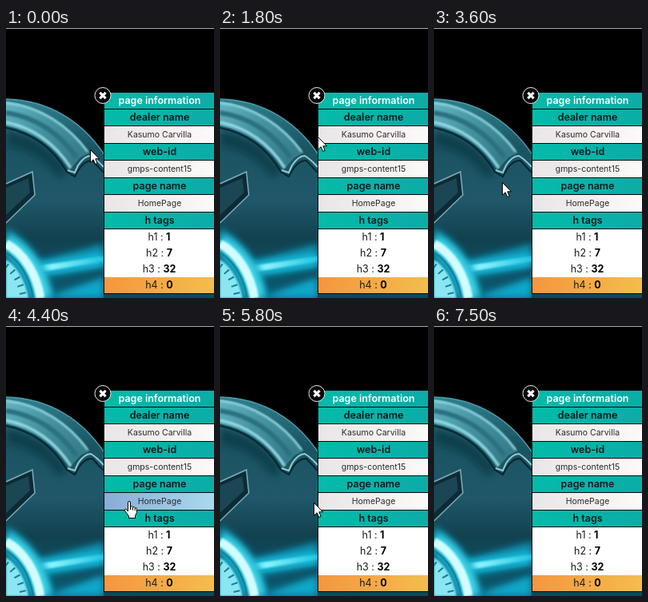
An HTML page that plays this animation: 260 px wide and 338 px high, repeating every 7600 ms.

```html
<!DOCTYPE html>
<html lang="en">
<head>
<meta charset="utf-8">
<title>Page information panel</title>
<style>
html, body { margin: 0; width: 100%; height: 100%; overflow: hidden; background: #000; }
svg { display: block; width: 260px; height: 338px; }
.panel { font-family: Inter, "Noto Sans", sans-serif; text-anchor: middle; }
.head { font-size: 12.5px; font-weight: 600; }
.value { font-size: 10.5px; fill: #2b2b2b; }
.count { font-size: 12.5px; fill: #1c1c1c; }
.count tspan { font-weight: 700; fill: #000; }
.tip { font: 11.7px "Open Sans", "Noto Sans", sans-serif; fill: #575757; }
</style>
</head>
<body>
<svg viewBox="0 0 260 338" xmlns="http://www.w3.org/2000/svg">
  <defs>
    <linearGradient id="body" x1="0" y1="0" x2="0" y2="1">
      <stop offset="0" stop-color="#2f7f8d"/>
      <stop offset=".25" stop-color="#1a5361"/>
      <stop offset=".5" stop-color="#20586a"/>
      <stop offset=".7" stop-color="#12414f"/>
      <stop offset="1" stop-color="#0a5a72"/>
    </linearGradient>
    <linearGradient id="rim" x1="0" y1="0" x2="1" y2=".8">
      <stop offset="0" stop-color="#62b4c1"/>
      <stop offset=".45" stop-color="#4693a2"/>
      <stop offset="1" stop-color="#347886"/>
    </linearGradient>
    <linearGradient id="beam" x1="0" x2="1">
      <stop offset="0" stop-color="#35e2f6"/>
      <stop offset=".35" stop-color="#8bf3fc"/>
      <stop offset="1" stop-color="#22c4e0"/>
    </linearGradient>
    <linearGradient id="teal">
      <stop offset="0" stop-color="#04bba9"/>
      <stop offset="1" stop-color="#0caca7"/>
    </linearGradient>
    <linearGradient id="plain">
      <stop offset="0" stop-color="#e8e6e6"/>
      <stop offset="1" stop-color="#fbfaf8"/>
    </linearGradient>
    <linearGradient id="hover">
      <stop offset="0" stop-color="#88acd6"/>
      <stop offset="1" stop-color="#a8daec"/>
    </linearGradient>
    <linearGradient id="warm">
      <stop offset="0" stop-color="#f5963f"/>
      <stop offset="1" stop-color="#f3bd4c"/>
    </linearGradient>
    <linearGradient id="tipFill" x1="0" y1="0" x2="0" y2="1">
      <stop offset="0" stop-color="#fff"/>
      <stop offset="1" stop-color="#e5e6f0"/>
    </linearGradient>
    <filter id="soft1" x="-20%" y="-50%" width="140%" height="200%"><feGaussianBlur stdDeviation="1"/></filter>
    <filter id="soft4" x="-30%" y="-100%" width="160%" height="300%"><feGaussianBlur stdDeviation="4"/></filter>
  </defs>

  <rect width="260" height="338" fill="#000"/>
  <rect width="260" height="1" fill="#aaa"/>

  <g id="scene">
    <path d="M0 89C50 90 98 114 130 170V338H0Z" fill="url(#body)"/>
    <path d="M0 89C50 90 98 114 130 170" fill="none" stroke="#4c9dab" stroke-width="1.4"/>
    <path d="M0 128C34 134 58 152 76 180L66 188C48 164 28 152 0 147Z" fill="#113f4c" filter="url(#soft4)"/>

    <path d="M0 92C42 96 80 122 105 156L93 162 86 170 79 178C62 150 36 130 0 122Z" fill="url(#rim)"/>
    <path d="M0 94C42 98 78 122 102 155" fill="none" stroke="#8fd3dc" stroke-width="2.5" filter="url(#soft1)"/>
    <path d="M0 106C38 112 67 132 88 162" fill="none" stroke="#2c7180" stroke-width="6" filter="url(#soft1)"/>
    <path d="M0 118C36 125 62 146 81 175" fill="none" stroke="#9adfe7" stroke-width="3" filter="url(#soft1)"/>
    <path d="M0 125C35 132 59 151 76 180L86 186 91 177Q99 165 108 166L122 181" fill="none" stroke="#08242e" stroke-width="2"/>
    <path d="M77 178L86 181 90 172Q98 160 106 160 113 164 122 174" fill="none" stroke="#8fcbd3" stroke-width="2"/>

    <path d="M0 195L33 180 36 209 0 244Z" fill="#0c2b36"/>
    <path d="M0 200L28 188 30 206 0 234Z" fill="#1b4653"/>
    <path d="M0 195L33 180 36 209 0 244" fill="none" stroke="#79aab3" stroke-width="1.6"/>

    <path d="M24 296L122 270V300L35 314Z" fill="#0f8fae" filter="url(#soft4)"/>
    <path d="M24 297L122 282V297L35 310Z" fill="#17bddd" filter="url(#soft4)"/>
    <path d="M24 300L122 286V292L33 307Z" fill="url(#beam)" filter="url(#soft1)"/>
    <path d="M48 338L122 312V338Z" fill="#11a8ca" filter="url(#soft4)"/>
    <path d="M0 250C30 266 52 298 60 338H0Z" fill="#0b95b4" filter="url(#soft4)"/>
    <path d="M0 268C24 280 42 306 47 338" fill="none" stroke="#41d9ed" stroke-width="18" filter="url(#soft4)"/>
    <path d="M0 270C22 282 38 307 43 338" fill="none" stroke="#d2fcff" stroke-width="11" filter="url(#soft1)"/>
    <path d="M0 290C15 300 24 317 28 338H0Z" fill="#8ae6f1" filter="url(#soft1)"/>
    <path d="M0 281C18 292 30 313 34 338" fill="none" stroke="#157f98" stroke-width="2"/>
    <path d="M0 298C12 306 19 320 22 338" fill="none" stroke="#157f98" stroke-width="8" stroke-dasharray="2 8"/>
    <rect x="122" y="333" width="138" height="5" fill="#0b4a5a"/>
  </g>

  <g id="panel" class="panel"></g>
  <g>
    <circle cx="121" cy="84.5" r="10" fill="#080808" stroke="#e8e8e8"/>
    <path d="M117.4 80.9L124.6 88.1M124.6 80.9L117.4 88.1" stroke="#fff" stroke-width="3.2"/>
  </g>
  <g id="tips"></g>
  <g id="cursor" stroke="#000" fill="#fff" stroke-linejoin="round">
    <path id="arrow" d="M.5 .5V16.2L4.2 12.8 6.7 18.5 9.2 17.4 6.8 11.8H11.6Z"/>
    <g id="hand" transform="translate(-5 0)">
      <path d="M4.5 13V2Q4.5 .5 6 .5T7.5 2V7Q10 5.8 10.5 7.7 12.8 6.8 13.2 8.6 15.5 8.2 15.5 10.5V14.5L13.5 18.5V21.5H5.5V19L1 13Q-.4 10.6 1.2 10.2 2.6 9.8 4.5 13Z"/>
      <path d="M7.5 7V11M10.5 8V11.5M13.2 9V12" fill="none"/>
    </g>
  </g>
</svg>
<script>
const LOOP = 7600, STEP = 100;
const $ = id => document.getElementById(id);

function add(parent, tag, attrs, text) {
  const el = document.createElementNS("http://www.w3.org/2000/svg", tag);
  for (const k in attrs) el.setAttribute(k, attrs[k]);
  if (text) el.textContent = text;
  parent.append(el);
  return el;
}

const panel = $("panel");
const box = (y, height, fill) => add(panel, "rect", { x: 122, y, width: 138, height, fill });
const label = (x, y, cls, text, fill = "") =>
  add(panel, "text", { x, y, class: cls, style: fill && `fill: ${fill}` }, text);

function heading(y, text, fill = "#08191b") {
  box(y, 20, "url(#teal)");
  label(192, y + 14, "head", text, fill);
}

// The black backing shows through as the lines between rows.
box(80, 253, "#080808");
heading(81, "page information", "#fff");
const rows = [
  ["dealer name", "Kasumo Carvilla"],
  ["web-id", "gmps-content15"],
  ["page name", "HomePage"]
].map(([name, value], i) => {
  const y = 102 + i * 43;
  heading(y, name);
  const rect = box(y + 21, 21, "url(#plain)");
  label(192, y + 35, "value", value);
  return { top: y + 21, rect };
});
heading(231, "h tags");
box(252, 60, "#fff");
box(312, 20, "url(#warm)");
[1, 7, 32, 0].forEach((n, i) => {
  const line = label(191.5, 266 + i * 20, "count", `h${i + 1} : `);
  add(line, "tspan", {}, String(n));
});
add(panel, "path", { d: "M122.5 80V333", stroke: "#080808" });

// text, x, y, width, start, end
const tips = [
  ["Copy Dealer Name", 155.5, 157.5, 112, 1400, 1800],
  ["Copy Web ID", 157.5, 197.5, 82, 3000, 3400],
  ["Copy Page Name", 159.5, 242.5, 103, 5100, 5700],
  ["Zirn Glide", 121.5, 244.5, 69, 6100, 7500]
].map(([text, x, y, width, start, end]) => {
  const g = add($("tips"), "g", { transform: `translate(${x} ${y})` });
  add(g, "rect", { x: 2, y: 2, width, height: 19, rx: 2, fill: "#000", opacity: .3 });
  add(g, "rect", { width, height: 19, rx: 2, fill: "url(#tipFill)", stroke: "#767676" });
  add(g, "text", { x: 5.5, y: 13.5, class: "tip" }, text);
  return { g, start, end };
});

// time, x, y of the pointer tip
const path = [
  [0, 105, 152], [200, 105, 152], [800, 176, 133], [1100, 150, 134],
  [1600, 150, 134], [1800, 122, 136], [2100, 98, 167], [2500, 152, 174],
  [3200, 152, 174], [3600, 85, 193], [3800, 91, 217], [4500, 163, 219],
  [4600, 154, 219], [5500, 154, 219], [5800, 117, 221], [6200, 117, 221],
  [6400, 71, 267], [6600, 38, 282], [6700, 100, 300]
];
const GONE = 6800;

function pointer(t) {
  const i = path.findIndex(p => p[0] > t);
  if (i < 0) return path[path.length - 1].slice(1);
  const [t0, x0, y0] = path[i - 1], [t1, x1, y1] = path[i];
  const k = (t - t0) / (t1 - t0);
  return [x0 + (x1 - x0) * k, y0 + (y1 - y0) * k];
}

const show = (el, on) => el.setAttribute("visibility", on ? "visible" : "hidden");

function draw(t) {
  const [x, y] = pointer(t), seen = t < GONE;
  let over = false;
  for (const { top, rect } of rows) {
    const hit = seen && x > 123 && y >= top && y < top + 22;
    rect.setAttribute("fill", hit ? "url(#hover)" : "url(#plain)");
    over = over || hit;
  }
  $("cursor").setAttribute("transform", `translate(${Math.round(x)} ${Math.round(y)})`);
  show($("arrow"), seen && !over);
  show($("hand"), seen && over);
  for (const { g, start, end } of tips) {
    const fade = Math.min((t - start + STEP) / 300, (end - t) / 300, 1);
    g.setAttribute("opacity", t < start ? 0 : Math.max(0, fade));
  }
}

const origin = performance.now();
function tick() {
  const t = (performance.now() - origin) % LOOP;
  draw(Math.floor(t / STEP) * STEP);
  requestAnimationFrame(tick);
}
tick();
</script>
</body>
</html>
```
